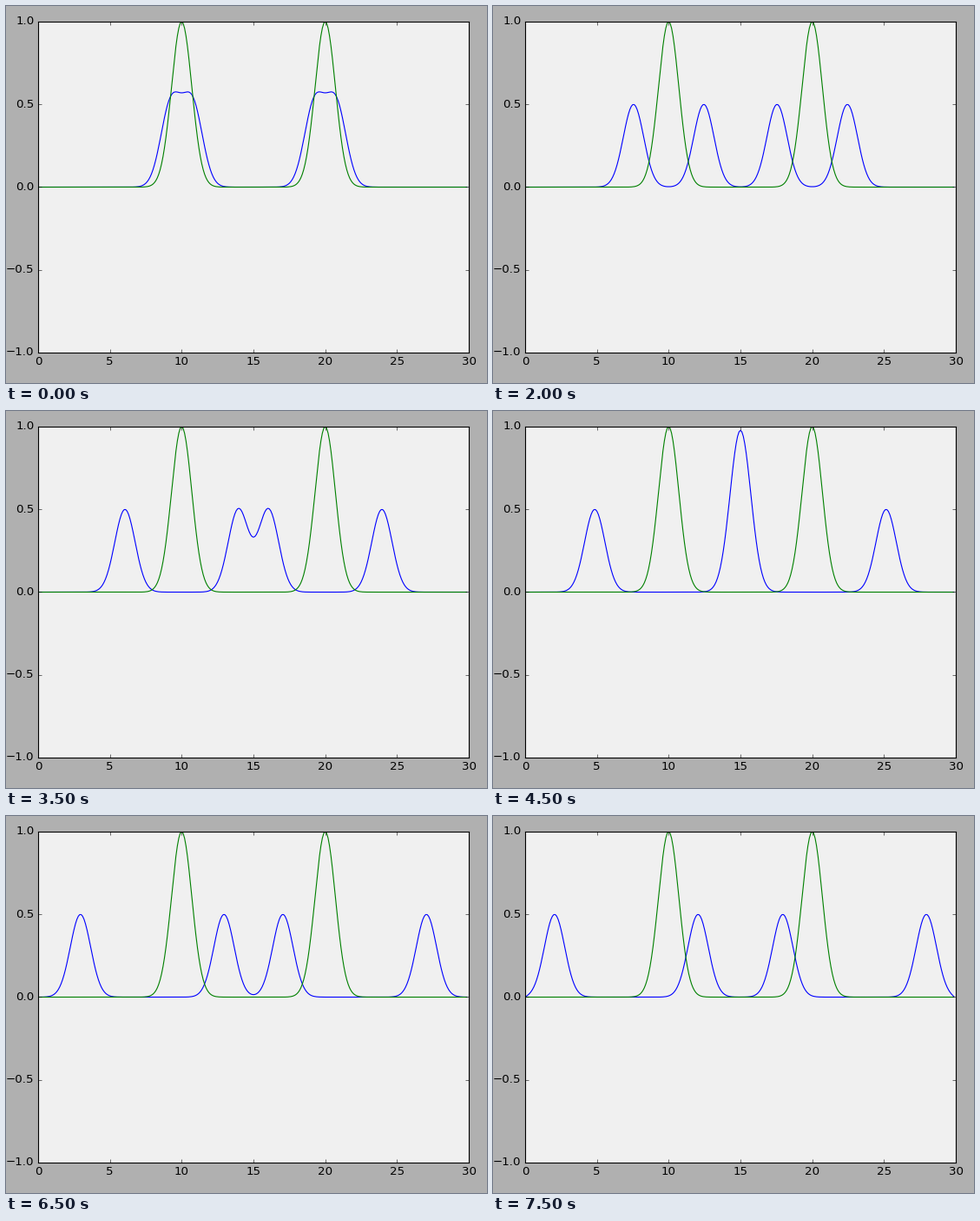
A matplotlib script that plays this animation: 554x434 px, repeating every 8000 ms.

```python
import numpy as np
import matplotlib.pyplot as plt
from matplotlib.animation import FuncAnimation
from matplotlib.ticker import MultipleLocator

W, H, DPI = 554, 434, 80

plt.rcParams.update({
    "font.family": "DejaVu Sans",
    "font.size": 12,
    "lines.linewidth": 1.0,
    "lines.solid_capstyle": "butt",
    "lines.solid_joinstyle": "round",
    "axes.linewidth": 1.0,
    "axes.axisbelow": False,
    "xtick.direction": "in",
    "ytick.direction": "in",
    "xtick.top": True,
    "ytick.right": True,
    "xtick.major.size": 4,
    "ytick.major.size": 4,
    "xtick.major.width": 0.5,
    "ytick.major.width": 0.5,
    "xtick.major.pad": 4,
    "ytick.major.pad": 4,
    "ytick.alignment": "center",
    "savefig.dpi": "figure",
    "savefig.facecolor": "auto",
})

DX = 0.1
# Grid steps the waves have travelled at each redraw
STEPS = [7, 11, 14, 20, 24, 29, 35, 39, 43, 51, 57, 63, 67, 70, 74, 79]
CENTRES = (10, 20)
x = np.arange(300) * DX
wall = x[-1]


def bump(c):
    return np.exp(-(x - c) ** 2)


def wave(step):
    """Two travelling halves per bump, reflected at fixed ends."""
    shift = (step + 0.5) * DX
    y = np.zeros_like(x)
    for c in CENTRES:
        for p in (c - shift, c + shift):
            y += 0.5 * (bump(p) - bump(-p) - bump(2 * wall - p))
    return y


fig = plt.figure(figsize=(W / DPI, H / DPI), dpi=DPI, facecolor="#b0b0b0")
ax = fig.add_axes([37 / W, 35 / H, 496 / W, 381 / H], facecolor="#f0f0f0")
ax.set_xlim(0, 30)
ax.set_ylim(-1, 1)
ax.xaxis.set_major_locator(MultipleLocator(5))
ax.yaxis.set_major_locator(MultipleLocator(0.5))

moving, = ax.plot(x, wave(STEPS[0]), color=(0, 0, 1))
ax.plot(x, sum(bump(c) for c in CENTRES), color=(0, 0.5, 0))


def update(i):
    moving.set_ydata(wave(STEPS[i]))
    return moving,


anim = FuncAnimation(fig, update, frames=len(STEPS), interval=500,
                     repeat=True, repeat_delay=0, blit=False)
plt.show()
```
